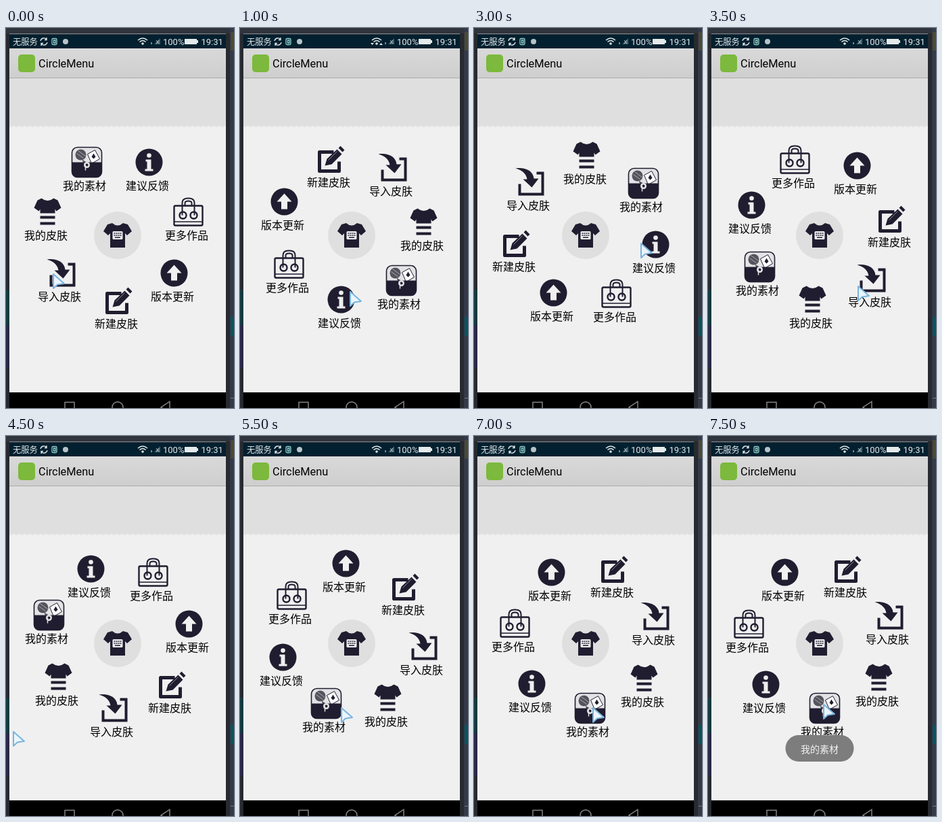
An HTML page for the animation above (8000 ms loop, 337 by 559 pixels).

```html
<!DOCTYPE html>
<html lang="zh-CN">
<head>
<meta charset="utf-8">
<title>CircleMenu</title>
<style>
html, body { margin: 0; width: 100%; height: 100%; overflow: hidden; background: #272a30 }
svg { display: block; width: 337px; height: 559px }
text { font-family: "Noto Sans CJK SC", "Noto Sans CJK", "Noto Sans CJK JP", sans-serif }
.latin { font-family: Roboto, sans-serif }
.label { font-size: 16px; text-anchor: middle }
.ink { fill: #211d30 }
.line { fill: none; stroke: #211d30 }
</style>
</head>
<body>
<svg viewBox="0 0 337 559">
  <defs>
    <linearGradient id="bar" x2="0" y2="1"><stop stop-color="#d9d9d9"/><stop offset="1" stop-color="#cecece"/></linearGradient>
    <clipPath id="wallet"><rect x="-21" y="-22" width="44" height="44" rx="8"/></clipPath>
  </defs>

  <!-- desktop edges -->
  <rect width="337" height="559" fill="#272a30"/>
  <rect width="337" height="8" fill="#30343d"/>
  <path d="M5 8.5H325" stroke="#7d8790"/>
  <path d="M0 385H5V437H0Z" fill="#143a40"/>
  <path d="M0 437H5V500H0Z" fill="#292847"/>
  <path d="M331 0H337V559H331Z" fill="#353a48"/>
  <path d="M332 6H337V33H332Z" fill="#4b4a33"/>
  <path d="M332 425H337V453H332Z" fill="#075461"/>
  <path d="M332 544.5H337" stroke="#777d86"/>

  <!-- phone screen -->
  <rect x="5" y="10" width="320" height="20" fill="#02202f"/>
  <rect x="5" y="30" width="320" height="44" fill="url(#bar)"/>
  <rect x="5" y="73" width="320" height="71" fill="#dfdfdf"/>
  <path d="M5 73.5H325" stroke="#adadad"/>
  <rect x="5" y="144" width="320" height="392" fill="#f0f0f0"/>
  <path d="M5 144.5H325" stroke="#e2e2e2" stroke-width="2" stroke-dasharray="5 3"/>
  <rect x="5" y="536" width="320" height="23" fill="#000"/>
  <g fill="none" stroke="#8a8a8a" stroke-width="1.4">
    <rect x="87" y="550.5" width="14" height="14"/>
    <circle cx="165" cy="558" r="8"/>
    <path d="M242 549.5V566L229 558Z"/>
  </g>

  <!-- status bar -->
  <g fill="#e4eaec" font-size="12.3">
    <text x="10" y="24.6">无服务</text>
    <text class="latin" x="232" y="24.6" font-size="13">100%</text>
    <text class="latin" x="288.5" y="24.6" font-size="13">19:31</text>
    <path d="M264 16H282V18H284V22H282V24H264Z"/>
    <circle cx="88" cy="20" r="4" fill="#b6c3c9"/>
    <path d="M228 15V24H219Z" fill="#42616d"/>
    <path d="M214 21h2v3h-2z" fill="#718891"/>
    <path d="M222 18l4 5m0-5l-4 5" stroke="#b8c4c8"/>
    <g fill="none" stroke="#dfe7e9" stroke-width="1.3">
      <path d="M51 19A5 5 0 0 1 60 17M61 21A5 5 0 0 1 52 23M60 14V17.5H57M52 26V22.5H55"/>
      <rect x="68" y="15.500" width="7" height="9" rx="1.500" stroke="#8fd0cb"/>
      <path d="M70.500 18H73V22H70.500Z" stroke="#8fd0cb"/>
      <path d="M195 18Q202 12 209 18M197.500 20.500Q202 16.500 206.500 20.500" stroke-width="1.6"/>
    </g>
    <circle cx="202" cy="23" r="1.800"/>
    <path id="traffic" d="M193 22H198L195.500 25ZM206 25H211L208.500 22Z"/>
  </g>

  <rect x="18" y="39" width="25" height="26" rx="5" fill="#7cb93c"/>
  <text class="latin" x="48" y="58" font-size="16.4">CircleMenu</text>

  <!-- hub -->
  <circle cx="165" cy="305" r="35" fill="#dfdfdf"/>
  <g transform="translate(165 305)">
    <path class="ink" d="M-8-18Q0-11 8-18L15-16L21-6L14 0L11-3V18H-11V-3L-14 0L-21-6L-15-16Z"/>
    <rect x="-7.500" y="-6" width="15" height="12" rx="1.500" fill="#eee"/>
    <path d="M-5.500-3H6M-5.500 0H6" stroke="#211d30" stroke-width="1.6" stroke-dasharray="2 1"/>
    <path d="M-4 3.200H4" stroke="#211d30" stroke-width="1.500"/>
  </g>

  <g id="menu"></g>

  <g id="toast">
    <rect x="114.500" y="440" width="101" height="39" rx="19.500" fill="#7d7d7d"/>
    <text x="165" y="465.500" font-size="14" fill="#f2f2f2" text-anchor="middle">我的素材</text>
  </g>
  <path id="cursor" d="M0 0V21L6 15.500L16 14Z" fill="#eaf5fd" stroke="#79b4de" stroke-width="2" stroke-linejoin="round"/>
</svg>

<script>
const $ = id => document.getElementById(id);

// Clockwise, starting at the bottom of the ring; icons are drawn around 0,0.
const items = [
  ['新建皮肤', `<path class="line" stroke-width="5" stroke-linejoin="round" d="M5-10H-16V18H13V4"/>
    <path class="ink" d="M-8 10L-5 0L10-14L17-7L2 8ZM12-16L15-19L21-13L18-10Z"/>
    <path d="M-3 2L10-11" stroke="#8a8893"/>`],
  ['导入皮肤', `<path class="line" stroke-width="4" d="M10-13H19V18H-15V3"/>
    <path class="ink" d="M-21-20C-8-22 5-17 6-5H13L3 8L-10-4H-4C-5-11-10-17-21-20Z"/>`],
  ['我的皮肤', `<path class="ink" d="M-9-20Q0-13 9-20L15-17L20-6L13-1L11-4V2H-11V-4L-13-1L-20-6L-15-17ZM-11 6H11V10H-11ZM-11 15H11V19H-11Z"/>`],
  ['我的素材', `<g clip-path="url(#wallet)"><rect x="-22" y="-22" width="46" height="46" fill="#e3e3e5"/>
    <path d="M2-12L13-18L20-5L8 2Z" fill="#fff" stroke="#211d30"/><path class="ink" d="M11-13L14-8L11-5L8-8Z"/>
    <circle cx="-8" cy="-11" r="8" fill="#55535e"/><path d="M-14-13L-4-6M-12-17L-1-9" stroke="#aaa"/>
    <path d="M-6-4L4 2H-4Z" fill="#55535e"/>
    <path class="ink" d="M-22 0H24V24H-22Z"/></g>
    <rect class="line" x="-21" y="-22" width="44" height="44" rx="8" stroke-width="1.6"/>
    <circle cx="1" cy="4" r="4.500" fill="#e3e3e5"/><circle class="ink" cx="1" cy="4" r="2"/>
    <path d="M-1 4V12" stroke="#e3e3e5" stroke-width="1.500"/>`],
  ['建议反馈', `<circle class="ink" r="20"/><circle cy="-10" r="3.300" fill="#eee"/>
    <path fill="#eee" d="M-5-4H3V10H6V13H-6V10H-3V-1H-5Z"/>`],
  ['更多作品', `<g class="line" stroke-width="2.400"><rect x="-21" y="-9" width="42" height="29" rx="2"/>
    <path d="M-9 5V-13Q-9-20-1-20H1Q9-20 9-13V5M-5-9V-13Q-5-16 0-16Q5-16 5-13V-9" stroke-width="2"/>
    <circle cx="-8" cy="5" r="5"/><circle cx="8" cy="5" r="5"/><path d="M-21 14.500H21" stroke-width="1.500"/></g>`],
  ['版本更新', `<circle class="ink" r="20"/><path fill="#f0f0f0" d="M0-12L11 0H4.500V11H-4.500V0H-11Z"/>`]
];

$('menu').innerHTML = items.map(([name, icon]) =>
  `<g><g transform="translate(2.500 -34.500)">${icon}</g><text class="label" y="6">${name}</text></g>`).join('');
const nodes = [...$('menu').children];

// Every half second: ring rotation in degrees, cursor x, cursor y
const steps = [
  [0, 70, 362], [128.6, 110, 365], [162.8, 163, 388], [166, 185, 395],
  [0, 190, 406], [38.6, 232, 380], [77.8, 247, 317], [262.8, 222, 380],
  [308.6, 110, 415], [312.2, 11, 435], [251.3, 100, 418], [226.9, 150, 400],
  [203.9, 195, 370], [203.9, 186, 409], [203, 176, 400], [202.3, 171, 395]
];

function draw(now) {
  const i = Math.floor(now % 8000 / 500);
  const [turn, x, y] = steps[i];
  nodes.forEach((node, k) => {
    const a = (90 + turn + k * 360 / 7) * Math.PI / 180;
    const px = 162.7 + 106.6 * Math.cos(a), py = 328.4 + 106.6 * Math.sin(a);
    node.setAttribute('transform', `translate(${Math.round(px)} ${Math.round(py)})`);
  });
  $('cursor').setAttribute('transform', `translate(${x} ${y})`);
  $('traffic').style.display = i === 1 || i === 2 ? '' : 'none';
  $('toast').style.display = i === 15 ? '' : 'none';
}

const start = performance.now();
function tick() {
  draw(performance.now() - start);
  requestAnimationFrame(tick);
}
tick();
</script>
</body>
</html>
```
